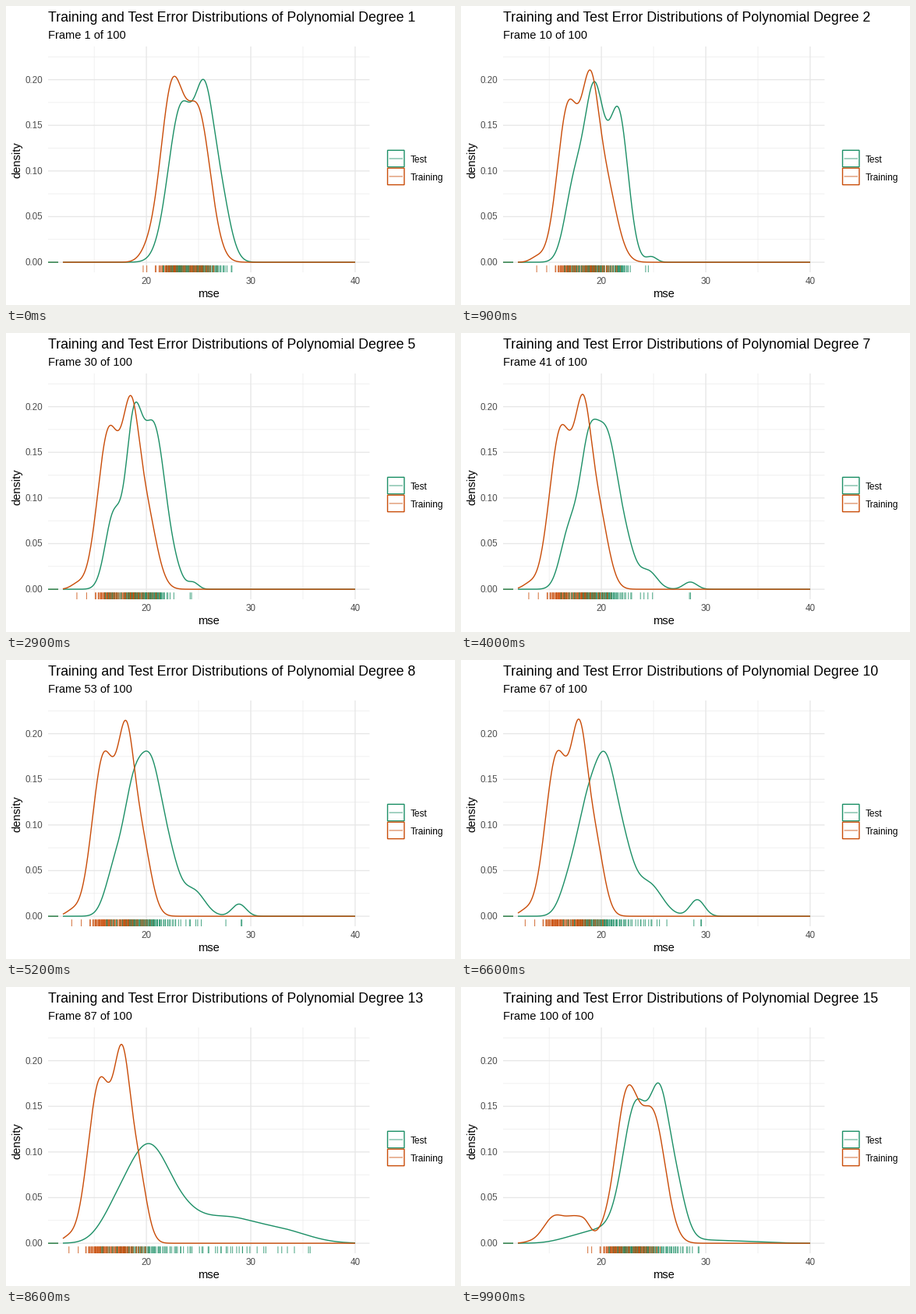
A matplotlib script for the animation above (10000 ms loop, 576 by 384 pixels).

```python
import numpy as np
import matplotlib.pyplot as plt
from matplotlib.animation import FuncAnimation
from matplotlib.collections import LineCollection
from matplotlib.patches import Rectangle

W, H, DPI = 576, 384, 96
PX = 72 / DPI                     # points per pixel
FRAMES, STATES, N = 100, 15, 100
GREEN, RED = "#1c8f66", "#c94c08"
LEFT, RIGHT, TOP, BOTTOM = 54, 466.4, 52, 342
plt.rcParams["font.family"] = ["Liberation Sans", "DejaVu Sans"]

# Each density is a sum of bells (height, centre, width), keyed by degree.
# Degree 1 stands alone; the others blend between the keys.
TEST = {
    1: [(.17, 23.35, 1.25), (.14, 25.55, .85), (.075, 27, .95)],
    3: [(.08, 17.4, .9), (.185, 19.35, .95), (.158, 21.65, .88),
        (.005, 22.8, .7), (.006, 24.8, .5), (0, 28, .6)],
    5: [(.08, 16.85, .8), (.155, 18.75, .75), (.178, 20.7, 1.12),
        (.01, 22.8, .7), (.007, 24.5, .5), (0, 28, .6)],
    11: [(.03, 16.9, .9), (.11, 18.7, 1.05), (.13, 20.4, .95),
         (.07, 22, 1), (.036, 24.5, 1.3), (.0185, 29.2, .7)],
    14: [(.02, 16.8, 1.5), (.05, 19, 1.8), (.053, 20.7, 1.7),
         (.03, 23, 2), (.027, 28, 2.8), (.012, 33.5, 2.5)],
}
TRAIN = {
    1: [(.187, 22.45, 1.1), (.158, 25, 1.15), (.01, 20.2, .8)],
    3: [(.172, 16.85, 1.05), (.145, 18.9, .78), (.09, 20.3, 1.1),
        (.005, 13.8, .6)],
    14: [(.178, 15.55, 1.13), (.175, 17.7, .77), (.075, 19.2, .8),
         (.005, 12.4, .6)],
    15: [(.195, 15.5, 1.05), (.165, 17.6, .9), (.06, 18.5, .5),
         (.005, 13, .6)],
}

xs = np.linspace(12, 40, 600)
rng = np.random.default_rng(4)


def bells(keys, degree):
    if degree == 1:
        return np.array(keys[1])
    known = [k for k in keys if k > 1]
    poses = np.array([keys[k] for k in known])
    at = np.interp(np.log(degree), np.log(known), range(len(known)))
    i = min(int(at), len(known) - 2)
    return poses[i] + (at - i) * (poses[i + 1] - poses[i])


def density(parts, tighten=1):
    h, c, w = parts.T[:, :, None]
    w = w * tighten
    return (h / tighten * np.exp(-.5 * ((xs - c) / w) ** 2)).sum(0)


def scores(parts, ranks):
    """Single scores, less spread out than their smoothed density."""
    cdf = np.cumsum(density(parts, .7))
    return np.interp(ranks, cdf / cdf[-1], xs)


def states(keys):
    ranks = (np.arange(N) + .5 + rng.uniform(-.9, .9, N)) / N
    ranks = np.clip(ranks, .004, .994)
    parts = [bells(keys, d) for d in range(1, STATES + 1)]
    parts.append(parts[0])
    return ([density(p) for p in parts], [scores(p, ranks) for p in parts])


test_curves, test_scores = states(TEST)
train_curves, train_scores = states(TRAIN)
order = rng.permutation(2 * N)
starts = [round(k * FRAMES / STATES) for k in range(STATES + 1)]


def timing(i):
    """Index of the state and its eased progress to the next one."""
    k = np.searchsorted(starts, i, side="right") - 1
    t = max(0, 1 - (starts[k + 1] - i) / 3)
    return k, 4 * t ** 3 if t < .5 else 1 - 4 * (1 - t) ** 3


def to_x(v):
    return 180.1 + 13.39 * (np.asarray(v) - 20)


def to_y(v):
    return 329.1 - 1172.5 * np.asarray(v)


fig = plt.figure(figsize=(W / DPI, H / DPI), dpi=DPI, facecolor="white")
ax = fig.add_axes([0, 0, 1, 1])
ax.set(xlim=(0, W), ylim=(H, 0))
ax.axis("off")


def line(x, y, color, width, **kw):
    return ax.plot(x, y, color=color, lw=width * PX, snap=False,
                   solid_capstyle="butt", **kw)[0]


def text(x, y, s, size, color="black", **kw):
    kw.setdefault("va", "baseline")
    return ax.text(x, y, s, fontsize=size * PX, color=color, **kw)


def grid(v, horizontal, color, width):
    if horizontal:
        line([LEFT, RIGHT], [to_y(v)] * 2, color, width)
    else:
        line([to_x(v)] * 2, [TOP, BOTTOM], color, width)


for v in (15, 25, 35):
    grid(v, False, "#ebebeb", .7)
for v in np.arange(.025, .23, .05):
    grid(v, True, "#ebebeb", .7)
for v in (20, 30, 40):
    grid(v, False, "#e7e7e7", 1.36)
    text(to_x(v), 357, str(v), 11.6, "#4d4d4d", ha="center")
for v in np.arange(0, .21, .05):
    grid(v, True, "#e7e7e7", 1.36)
    text(47, to_y(v) + 4, f"{v:.2f}", 11.6, "#4d4d4d", ha="right")

text(260, 374, "mse", 14.65, ha="center")
text(21, 198, "density", 14.65, rotation=90, ha="right", va="center")

for y, name, color in ((185.3, "Test", GREEN), (208.2, "Training", RED)):
    ax.add_patch(Rectangle((489.5, y), 21.4, 21.4, fill=False, ec=color,
                           lw=1.4 * PX, snap=False))
    line([491.5, 509], [y + 10.7] * 2, color, 1.07, alpha=.75)
    text(519, y + 15.6, name, 11.85)

title = text(54, 20.5, "", 17.7)
subtitle = text(54, 42, "", 14.65)
line([LEFT, 67], [to_y(0)] * 2, "#2a7d45", 1.5, zorder=3)
test_line = line([], [], GREEN, 1.4, zorder=3)
train_line = line([], [], RED, 1.4, zorder=4)
rug = LineCollection([], colors=[GREEN if j < N else RED for j in order],
                     linewidths=1.07 * PX, alpha=.75, zorder=5,
                     capstyle="butt", snap=False)
ax.add_collection(rug)


def draw(i):
    k, w = timing(i)

    def blend(values):
        return (1 - w) * values[k] + w * values[k + 1]

    title.set_text("Training and Test Error Distributions of "
                   f"Polynomial Degree {k + 1}")
    subtitle.set_text(f"Frame {i + 1} of {FRAMES}")
    test_line.set_data(to_x(xs), to_y(blend(test_curves)))
    train_line.set_data(to_x(xs), to_y(blend(train_curves)))
    marks = np.concatenate([blend(test_scores), blend(train_scores)])[order]
    rug.set_segments([[(x, 333.2), (x, BOTTOM)] for x in to_x(marks)])
    return title, subtitle, test_line, train_line, rug


anim = FuncAnimation(fig, draw, frames=FRAMES, interval=100,
                     init_func=lambda: draw(0), repeat=True, repeat_delay=0)
plt.show()
```
